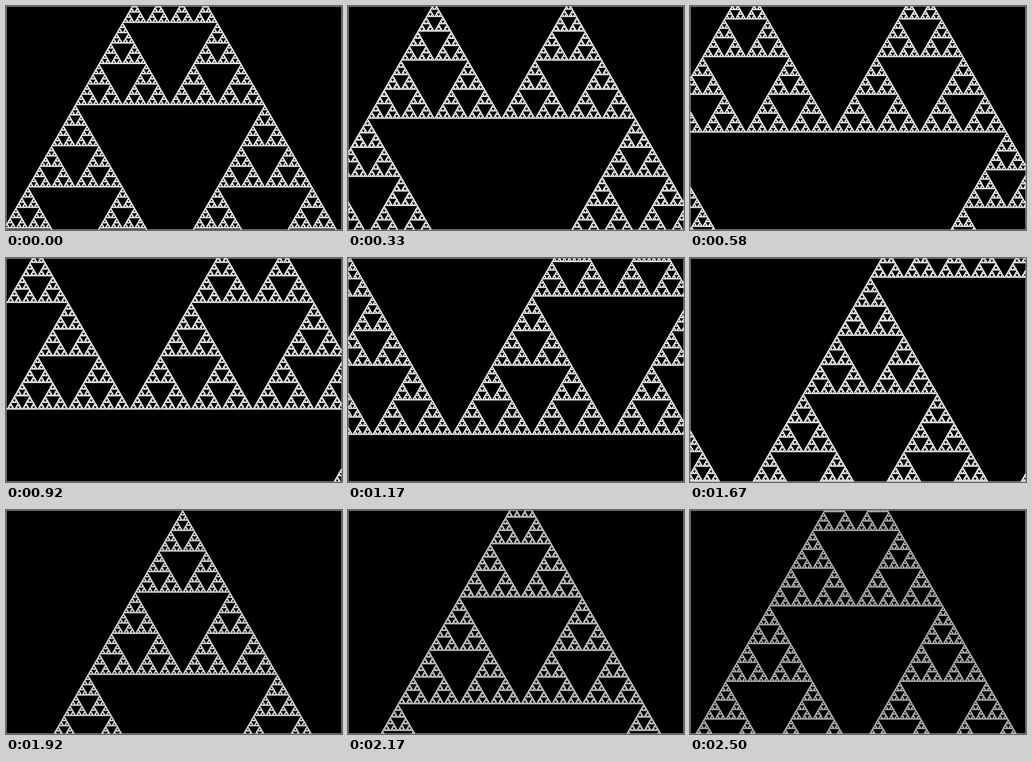
An HTML page with a canvas that plays this animation: 560x374 px, repeating every 2580 ms.

```html
<!DOCTYPE html>
<html lang="en">
<head>
<meta charset="utf-8">
<title>Sierpinski zoom</title>
<style>
  html, body { margin: 0; width: 100%; height: 100%; overflow: hidden; background: #000; }
  canvas { display: block; width: 560px; height: 374px; }
</style>
</head>
<body>
<canvas id="stage" width="560" height="374"></canvas>
<script>
const W = 560, H = 374, LOOP = 2580;
const ctx = document.getElementById('stage').getContext('2d');
const RATIO = 0.869;                   // height to side
const SIDE = 632;                      // outer triangle at zoom 1
const LEAF = 3;                        // triangles below this side are filled
const FOCUS = { x: 315.5, y: 110.2 };  // point that stays put while zooming

// Adds every visible leaf triangle below the apex (x, y) to the path.
function sierpinski(x, y, side) {
  const h = side * RATIO, half = side / 2;
  if (y > H || y + h < 0 || x + half < 0 || x - half > W) return;
  if (side < LEAF) {
    ctx.moveTo(x, y);
    ctx.lineTo(x + half, y + h);
    ctx.lineTo(x - half, y + h);
    ctx.closePath();
    return;
  }
  sierpinski(x, y, half);
  sierpinski(x - half / 2, y + h / 2, half);
  sierpinski(x + half / 2, y + h / 2, half);
}

// Zoom doubles every 8 steps; after 32 steps the figure repeats.
function draw(step) {
  const side = SIDE * 2 ** (step / 8);
  ctx.fillStyle = '#000';
  ctx.fillRect(0, 0, W, H);
  ctx.beginPath();
  // The focus lies at 1/15 of the width and 6/15 of the height from the apex.
  sierpinski(FOCUS.x - side / 15, FOCUS.y - side * RATIO * 0.4, side);
  // The figure dims a little towards the end of the loop.
  const light = 255 - 6 * Math.max(0, step - 20);
  ctx.fillStyle = ctx.strokeStyle = `rgb(${light}, ${light}, ${light})`;
  ctx.lineWidth = 0.9;
  ctx.lineJoin = 'bevel';
  ctx.fill();
  ctx.stroke();
  ctx.strokeStyle = '#aaa';
  ctx.lineWidth = 1;
  ctx.strokeRect(0.5, 0.5, W - 1, H - 1);
}

// Twelve pictures a second, rounded to 10 ms.
const startOf = k => Math.round(k * 25 / 3) * 10;

function stepAt(t) {
  let k = Math.floor(t * 0.012) + 1;
  while (startOf(k) > t) k--;
  return k < 23 ? k : k + 1;   // one step is skipped late in the loop
}

let shown = -1;
const origin = performance.now();
function tick() {
  const step = stepAt((performance.now() - origin) % LOOP);
  if (step !== shown) draw(shown = step);
  requestAnimationFrame(tick);
}
tick();
</script>
</body>
</html>
```
